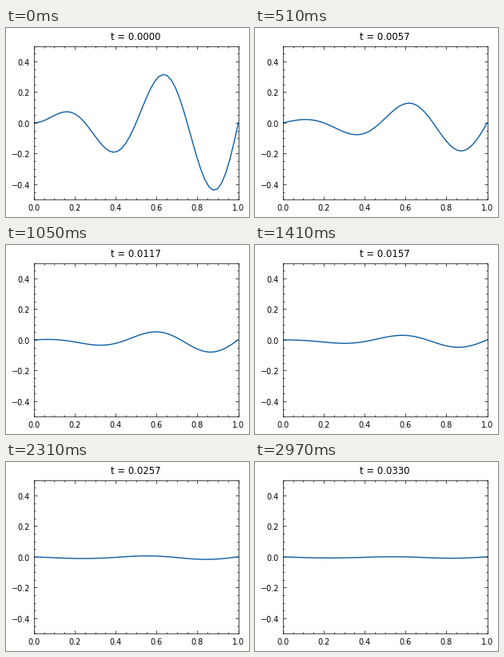
A matplotlib script for the animation above (3000 ms loop, 304 px wide and 237 px high).

```python
import numpy as np
import matplotlib.pyplot as plt
from matplotlib.animation import FuncAnimation
from matplotlib.transforms import Affine2D

W, H, DPI = 304, 237, 100
FRAMES, INTERVAL = 100, 30
DT = 1 / 3000

plt.rcParams.update({
    "font.family": "DejaVu Sans",
    "font.size": 7,
    "axes.linewidth": 0.5,
    "lines.linewidth": 1.0,
})
for axis, side in (("xtick", "top"), ("ytick", "right")):
    plt.rcParams.update({
        f"{axis}.direction": "in",
        f"{axis}.{side}": True,
        f"{axis}.major.size": 3,
        f"{axis}.major.width": 0.5,
        f"{axis}.minor.size": 1.5,
        f"{axis}.minor.width": 0.5,
        f"{axis}.minor.visible": True,
    })

# Sine series of u(x, 0) = x sin(4 pi x) / 2 on [0, 1]
x = np.linspace(0, 1, 50)
odd = np.arange(1, 200, 2)
modes = np.append(odd, 4)
coeffs = np.append((1 / (4 + odd) ** 2 - 1 / (4 - odd) ** 2) / np.pi**2, 0.25)
basis = np.sin(np.pi * np.outer(x, modes))


def heat(t):
    """Solution of u_t = u_xx with u = 0 at both ends."""
    return basis @ (coeffs * np.exp(-((np.pi * modes) ** 2) * t))


fig = plt.figure(figsize=(W / DPI, H / DPI), dpi=DPI)
ax = fig.add_axes([34.86 / W, 21.86 / H, 255.75 / W, 192.5 / H])
ax.set(xlim=(0, 1), ylim=(-0.5, 0.5))
ax.set_xticks(np.arange(6) * 0.2)
ax.set_yticks(np.arange(-2, 3) * 0.2)
line, = ax.plot(x, heat(0), color="#0C5DA5")
title = ax.set_title("t = 0.0000")

# Text sits a fraction of a pixel lower than the axes
drop = Affine2D().translate(0, -0.69)
for text in [title, *ax.get_xticklabels(), *ax.get_yticklabels()]:
    text.set_transform(text.get_transform() + drop)


def update(i):
    t = i * DT
    line.set_ydata(heat(t))
    title.set_text(f"t = {t:.4f}")
    return line, title


anim = FuncAnimation(fig, update, frames=FRAMES, interval=INTERVAL,
                     repeat=True, repeat_delay=0, blit=False)
plt.show()
```
